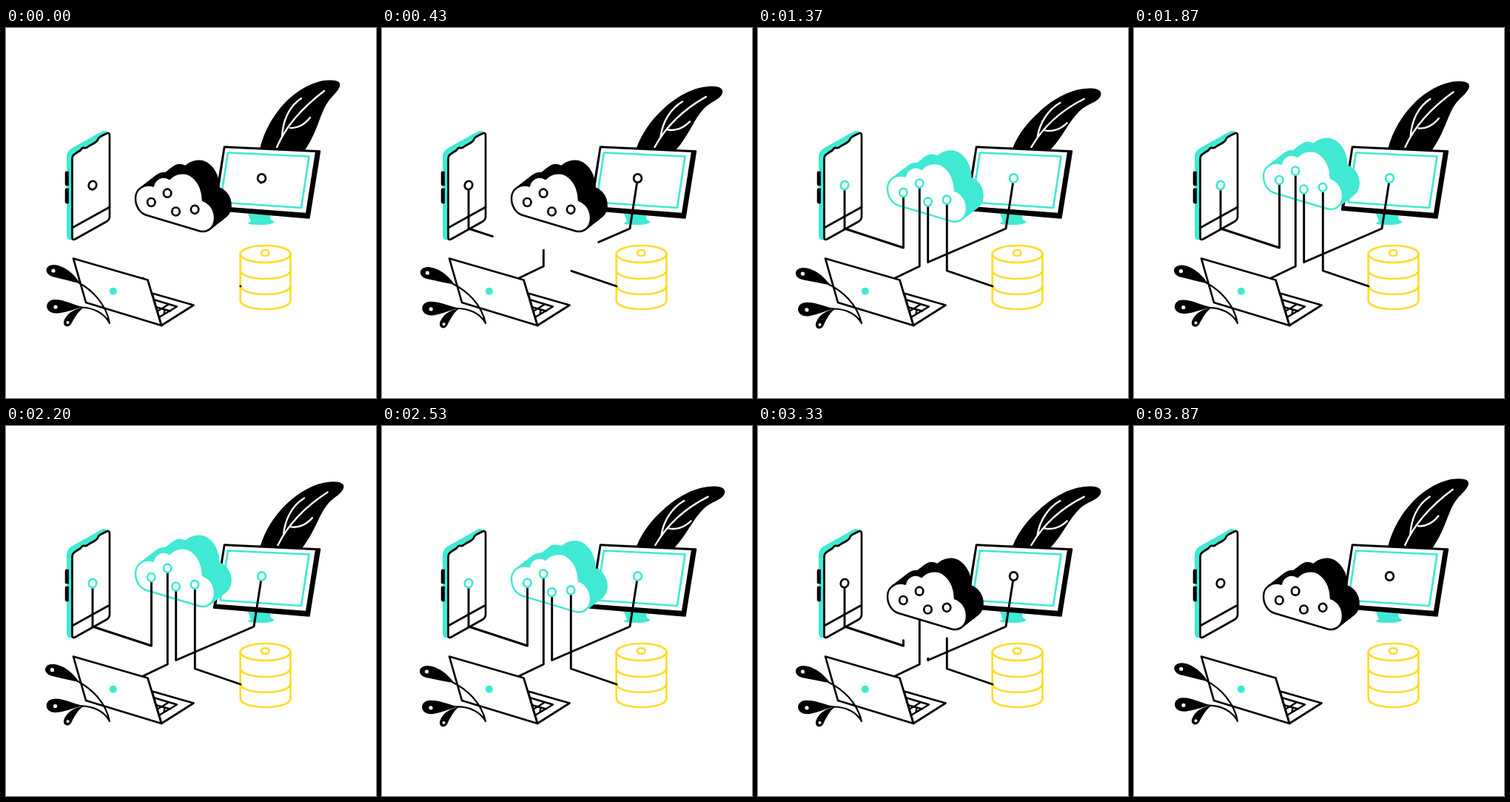
An HTML page with a canvas that plays this animation: 500x500 px, repeating every 3910 ms.

```html
<!DOCTYPE html>
<html lang="en">
<head>
<meta charset="utf-8">
<title>Connected devices</title>
<style>
  html, body { margin: 0; width: 100%; height: 100%; overflow: hidden; background: #fff; }
  canvas { display: block; width: 500px; height: 500px; }
</style>
</head>
<body>
<canvas id="stage" width="500" height="500"></canvas>
<script>
const ctx = document.getElementById('stage').getContext('2d');
const LOOP = 3910;
const BLACK = '#000', WHITE = '#fff', TEAL = '#40e9d3', YELLOW = '#ffdc2e';
const LIFT = 31, PEN = 2.7;

const ramp = (t, a, b) => Math.min(1, Math.max(0, (t - a) / (b - a)));

function paint(path, fill, stroke, width = PEN) {
  if (fill) { ctx.fillStyle = fill; ctx.fill(path); }
  if (stroke) { ctx.strokeStyle = stroke; ctx.lineWidth = width; ctx.stroke(path); }
}
const draw = (d, fill, stroke, width) => paint(new Path2D(d), fill, stroke, width);

function oval(x, y, rx, ry, fill, stroke, width, tilt = 0) {
  const p = new Path2D();
  p.ellipse(x, y, rx, ry, tilt, 0, Math.PI * 2);
  paint(p, fill, stroke, width);
}

const FACE = new Path2D('M190 253C180 250 175 240 175 230C175 218 186 210 199 213.5' +
  'C201 204 211 198 221 204C228 196 242 193 252 201C262 209 266 222 266 233' +
  'C275 236 282 245 282 257C282 269 273 277 262 274.5Z');

// Cloud sockets and the route from each device up to its socket
const LINKS = [
  { x: 196.5, y: 235.5, route: [[117, 218], [117, 271], [196.5, 297]] },
  { x: 218.3, y: 223.2, route: [[185, 338], [218.3, 322]] },
  { x: 229.7, y: 248, route: [[344.6, 209], [335, 271], [229.7, 316.5]] },
  { x: 255.3, y: 245.3, route: [[317, 349], [255.3, 328]] }
];

// Bezier points of the leaf: upright pose, then bent pose
const LEAF = [
  [343, 163, 349, 139, 361, 118, 376, 102, 393, 84, 417, 70.5, 437, 70.5, 449, 70, 454, 74, 450, 81,
    446, 89, 440, 92, 433, 103, 424, 118, 421, 140, 404, 165, 396, 175, 360, 190, 343, 163],
  [345, 161, 353, 146, 366, 131, 382, 119, 401, 102, 427, 87, 454, 87, 466, 87, 473, 92, 468, 100,
    462, 107, 447, 108, 436, 116, 418, 130, 408, 150, 391, 164, 380, 175, 360, 190, 345, 161]
];
const VEINS = [
  [[366, 161, 375, 140, 392, 114, 430, 85], [371, 161, 383, 143, 404, 117, 446, 101]],
  [[373, 147, 374, 126, 382, 106, 399, 95], [380, 147, 384, 130, 396, 113, 413, 104]],
  [[384, 135, 394, 136, 404, 130, 411, 121], [389, 140, 400, 143, 412, 140, 421, 132]]
];

function morph([a, b], k) {
  const q = a.map((v, i) => v + (b[i] - v) * k);
  const path = new Path2D();
  path.moveTo(q[0], q[1]);
  for (let i = 2; i < q.length; i += 6) path.bezierCurveTo(...q.slice(i, i + 6));
  return path;
}

function leaf(sway) {
  const k = sway * 1.12;
  paint(morph(LEAF, k), BLACK);
  for (const v of VEINS) paint(morph(v, k), null, WHITE, 2.4);
}

function monitor() {
  draw('M327 251L357 253L357.5 259Q363 261 362 263Q357 266 347 266L331 265.5L326 264L331 261.5Z', TEAL);
  draw('M295 160.5L424 166.5L409.5 256.5L281 245.5Z', BLACK, BLACK, 2.4);
  draw('M296.3 162.2L417.8 168L405 249.8L284.5 240.8Z', WHITE);
  draw('M300 168.5L409.5 173.5L399 243L289.5 235.5Z', null, TEAL);
}

function phone() {
  draw('M90 286.5Q82 287 82 281L82 174Q82 167 88 163L128 140.5Q135 137 140 142L140 150L95 285Z', TEAL);
  draw('M81 194h3.5v19h-2.5q-2 0 -2-2v-15q0-2 1-2ZM81 217h3.5v20h-2.5q-2 0 -2-2v-16q0-2 1-2Z', BLACK, BLACK, 0.6);
  draw('M89.5 283V177Q89.5 172 94 169.5L101 165Q103 161 106 162Q109 162.5 113 159L121 154.5' +
    'Q124 152.5 125 149Q126 147.5 129 146L136 142.5Q140 141 140 145V255Q140 259 136 261.5L94 285Q89.5 287.5 89.5 283Z',
    WHITE, BLACK);
  draw('M89.5 270L140 242', null, BLACK);
}

function database() {
  draw('M316.7 305V368C316.7 384 384.5 384 384.5 368V305', WHITE, YELLOW);
  oval(350.6, 305.5, 33.9, 11.5, WHITE, YELLOW);
  for (const y of [327, 348]) {
    draw(`M316.7 ${y}C316.7 ${y + 16} 384.5 ${y + 16} 384.5 ${y}`, null, YELLOW);
  }
  oval(350.3, 304, 5.3, 4, WHITE, YELLOW);
}

function laptop() {
  draw('M197.5 358.5L253.5 374.5L210 402Z', WHITE, BLACK);
  draw('M201 367.5L231 376.5L207.5 390.5M204 377.5L222 382.5M220.5 373L205 382.5M214.5 380L213.5 387', null, BLACK, 2.4);
  draw('M91 311.5L191.5 340.5L210 402L108 371Z', WHITE, BLACK);
  oval(144.8, 355.7, 5, 5, TEAL);
}

function sprigs(sway) {
  ctx.save();
  ctx.translate(140, 399);
  ctx.rotate(-sway * 5 * Math.PI / 180);
  ctx.translate(-140, -399);
  draw('M100 345C89 343 76 339 63 336C51 332 52 320 65 320C79 321 93 333 100 345Z', BLACK);
  draw('M106 377.5C96 378 84 384 70 385.5C51 387 51 367 66 367C80 367 92 375 106 377.5Z', BLACK);
  draw('M105 378C97 383 92 393 88 400C83 407 75 402 79 394C84 384 94 379 105 378Z', BLACK);
  draw('M98 344C116 354 135 372 140 399M102 377.5C118 378 133 385 140 399', null, BLACK, 2.2);
  oval(64, 328, 2.6, 2.6, WHITE);
  oval(67, 377, 2.6, 2.6, WHITE);
  oval(83.5, 398, 2, 2, WHITE);
  ctx.restore();
}

function cloud(lift, color) {
  ctx.save();
  ctx.translate(0, -lift);
  for (let i = 22; i > 0; i--) {
    ctx.save();
    ctx.translate(i, -i * 17 / 22);
    paint(FACE, color, color, 1.6);
    ctx.restore();
  }
  paint(FACE, WHITE, color, 2.5);
  ctx.restore();
}

function link({ x, y, route }, lift, part) {
  if (part <= 0) return;
  const pts = [...route, [x, y - lift + 6]];
  const path = new Path2D();
  let length = 0;
  pts.forEach((p, i) => {
    path.lineTo(...p);
    if (i) length += Math.hypot(p[0] - pts[i - 1][0], p[1] - pts[i - 1][1]);
  });
  if (part < 1) ctx.setLineDash([length * part, length * 2]);
  paint(path, null, BLACK, 2.9);
  ctx.setLineDash([]);
}

function render(t) {
  const half = LOOP / 2;
  const sway = 1 - Math.abs((t % half) / (half / 2) - 1);
  const part = ramp(t, 0, 950) - ramp(t, 3150, 3870);
  const lift = LIFT * (ramp(t, 980, 1900) - ramp(t, 2340, 3120));
  const color = t >= 960 && t < 3120 ? TEAL : BLACK;

  ctx.fillStyle = WHITE;
  ctx.fillRect(0, 0, 500, 500);
  ctx.lineCap = ctx.lineJoin = 'round';
  leaf(sway);
  monitor();
  phone();
  database();
  laptop();
  sprigs(sway);
  cloud(lift, color);
  for (const l of LINKS) link(l, lift, part);
  for (const l of LINKS) oval(l.x - 0.2, l.y - lift, 5.2, 5.5, WHITE, color);
  oval(117, 212.5, 5.2, 5.8, WHITE, color, PEN, 0.4);
  oval(345.5, 203, 5.4, 5.6, WHITE, color);
}

function tick() {
  render(performance.now() % LOOP);
  requestAnimationFrame(tick);
}
tick();
</script>
</body>
</html>
```
